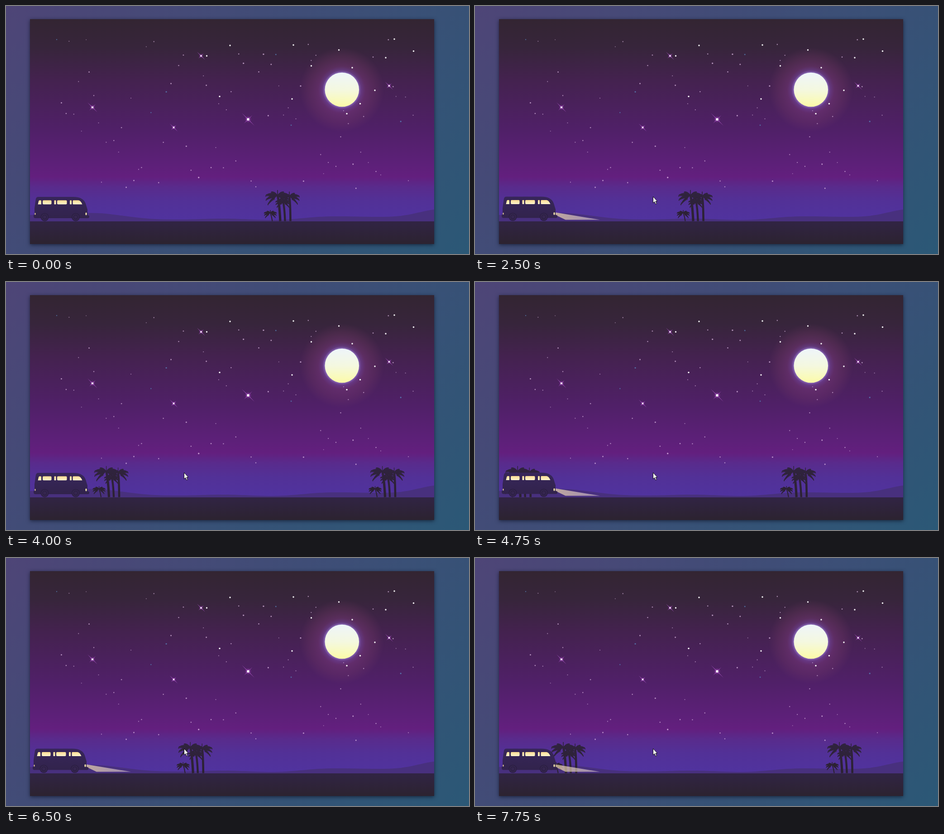
Animation of 1023 by 547 pixels, one loop 8000 ms. Source, as an HTML page:

```html
<!DOCTYPE html>
<html lang="en">
<head>
<meta charset="utf-8">
<title>Night drive</title>
<style>
html, body { margin: 0; width: 100%; height: 100%; overflow: hidden; background: linear-gradient(135deg, #4e4577, #2b5876); }
svg { display: block; width: 100%; height: 100%; }
.card { filter: drop-shadow(0 2px 4px rgba(12, 18, 38, .7)); }
</style>
</head>
<body>
<svg viewBox="0 0 1023 547" preserveAspectRatio="none">
  <defs>
    <linearGradient id="sky" x1="0" y1="29" x2="0" y2="475" gradientUnits="userSpaceOnUse">
      <stop offset="0" stop-color="#332532"/>
      <stop offset=".14" stop-color="#37253b"/>
      <stop offset=".3" stop-color="#44224f"/>
      <stop offset=".55" stop-color="#502068"/>
      <stop offset=".72" stop-color="#5d2079"/>
      <stop offset=".78" stop-color="#631f7e"/>
      <stop offset=".83" stop-color="#592b8c"/>
      <stop offset=".9" stop-color="#523197"/>
      <stop offset="1" stop-color="#50339f"/>
    </linearGradient>
    <linearGradient id="ground" x1="0" y1="0" x2="0" y2="1">
      <stop offset="0" stop-color="#312444"/>
      <stop offset="1" stop-color="#2c2330"/>
    </linearGradient>
    <linearGradient id="moon" x1="0" y1="0" x2="0" y2="1">
      <stop offset="0" stop-color="#eef5fa"/>
      <stop offset=".5" stop-color="#f4f8e0"/>
      <stop offset="1" stop-color="#fcfba8"/>
    </linearGradient>
    <radialGradient id="halo">
      <stop offset=".4" stop-color="#a58ae0" stop-opacity=".75"/>
      <stop offset=".46" stop-color="#8550b0" stop-opacity=".48"/>
      <stop offset=".56" stop-color="#853f80" stop-opacity=".38"/>
      <stop offset=".78" stop-color="#823f6c" stop-opacity=".22"/>
      <stop offset="1" stop-color="#80406a" stop-opacity="0"/>
    </radialGradient>
    <radialGradient id="flare">
      <stop offset="0" stop-color="#fff"/>
      <stop offset=".25" stop-color="#d877ea" stop-opacity=".7"/>
      <stop offset="1" stop-color="#a02ec0" stop-opacity="0"/>
    </radialGradient>
    <linearGradient id="glass" x1="0" y1="428" x2="0" y2="438" gradientUnits="userSpaceOnUse">
      <stop offset="0" stop-color="#fbd98f"/>
      <stop offset="1" stop-color="#fef7d0"/>
    </linearGradient>
    <linearGradient id="body" x1="0" y1="421" x2="0" y2="475" gradientUnits="userSpaceOnUse">
      <stop offset="0" stop-color="#37265a"/>
      <stop offset="1" stop-color="#31234a"/>
    </linearGradient>
    <linearGradient id="beamFill">
      <stop offset="0" stop-color="#ffe9b0" stop-opacity=".65"/>
      <stop offset="1" stop-color="#f4e4e4" stop-opacity=".5"/>
    </linearGradient>
    <linearGradient id="bark" x1="0" y1="403" x2="0" y2="475" gradientUnits="userSpaceOnUse">
      <stop offset="0" stop-color="#302340"/>
      <stop offset="1" stop-color="#2b2130"/>
    </linearGradient>
    <clipPath id="frame"><rect x="53" y="29" width="893" height="496"/></clipPath>
    <g id="grove" fill="url(#bark)" stroke="url(#bark)" stroke-linecap="round" stroke-linejoin="round"></g>
  </defs>

  <rect class="card" x="53" y="29" width="893" height="496" fill="#2c2330"/>
  <g clip-path="url(#frame)">
    <rect x="53" y="29" width="893" height="447" fill="url(#sky)"/>
    <circle cx="742" cy="184.500" r="93" fill="url(#halo)"/>
    <circle cx="742.300" cy="184.500" r="37.800" fill="url(#moon)"/>
    <g id="stars"></g>
    <path fill="#48307e" d="M53 461Q120 456 185 456.500C245 456 275 471 370 471C430 471 440 468.500 490 469C530 470 560 472 590 472C650 471 670 463.500 735 464C790 464 830 467 872 463C905 459 920 452 947 449V476H53Z"/>
    <rect x="53" y="475" width="893" height="50" fill="url(#ground)"/>
    <use id="near" href="#grove"/>
    <use id="far" href="#grove"/>
    <path id="beam" fill="url(#beamFill)" d="M176 455L276 471.500H200L178 461Z"/>
    <g id="van">
      <path fill="url(#body)" d="M71 421H148C165 421 173 427 176 436L180 449V461L184 462.500V466.500Q183 468 179 468H64Q61 467 61 465V461L63 460V446L65.500 428Q66 421 71 421Z"/>
      <g fill="url(#glass)">
        <path d="M74 428.500H76.500Q78 428.500 78 430V437.500H70.500L72 431Q72.500 428.500 74 428.500Z"/>
        <rect x="81" y="428.500" width="19.500" height="9" rx="2"/>
        <rect x="106.500" y="428.500" width="4" height="9" rx="1.200"/>
        <rect x="113" y="428.500" width="21.500" height="9" rx="2"/>
        <rect x="141" y="428.500" width="4" height="9" rx="1.200"/>
        <path d="M149 428.500H160Q165 429 168.500 437.500H149Q147.500 437.500 147.500 436V430Q147.500 428.500 149 428.500Z"/>
      </g>
      <ellipse cx="177" cy="458.500" rx="1.500" ry="3" fill="#fdeeb0"/>
      <ellipse cx="64.500" cy="458.500" rx="1" ry="2.300" fill="#f3d79c"/>
      <g id="wheels" fill="#35264f" stroke="#2a1e40" stroke-width="1.300"></g>
    </g>
  </g>
  <path id="cursor" fill="#fff" stroke="#111" stroke-width="1" stroke-linejoin="round" d="M.500 .500V14.500L3.700 11.500L6 17L8.300 16L6 10.800H10Z"/>
</svg>
<script>
const LOOP = 8000, STEP = 250;
const GAP = 610, SPEED = .1697, DEPART = 1770;
const $ = id => document.getElementById(id);

function add(parent, tag, attrs) {
  const el = document.createElementNS('http://www.w3.org/2000/svg', tag);
  for (const k in attrs) el.setAttribute(k, attrs[k]);
  parent.appendChild(el);
  return el;
}

let seed = 11;
function rand() {
  seed = (seed * 16807) % 2147483647;
  return seed / 2147483647;
}

function star(cx, cy, r, fill, opacity) {
  add($('stars'), 'circle', { cx, cy, r, fill, opacity });
}

// Faint stars, spread evenly across and at random heights
for (let i = 0; i < 84; i++) {
  const x = 112 + 794 * (i * .618034 % 1), y = 74 + 328 * rand(), size = rand();
  if (Math.hypot(x - 742, y - 184.5) < 45) continue;
  star(x, y, .9 + size * .75, i % 14 ? '#e6c2ec' : '#5c8fc4', .5 + size * .2);
}

// The brightest stars
for (const [x, y] of [[495, 87], [635, 86], [858, 73], [900.5, 99.5], [839, 114], [735.5, 97],
  [674.5, 132], [765, 136], [632, 205], [472, 199.5], [815, 186], [782.5, 215.5], [753, 237.5], [443.5, 110]]) {
  star(x, y, 1.75, '#fff', .95);
}

// Four-pointed sparkles with a longer falling diagonal
for (const [x, y, s] of [[191, 223.5, 11], [370.5, 268, 9], [431, 110, 9], [535, 250, 14], [846.5, 176, 9]]) {
  const a = s * .65, w = .55;
  const g = add($('stars'), 'g', { transform: `translate(${x} ${y})` });
  add(g, 'circle', { r: s * .55, fill: 'url(#flare)', opacity: .7 });
  add(g, 'path', { fill: '#b95fd4', opacity: .8,
    d: `M${-s} ${-s}L${w} ${-w}L${s} ${s}L${-w} ${w}ZM${a} ${-a}L${w} ${w}L${-a} ${a}L${-w} ${-w}Z` });
  add(g, 'circle', { r: s * .19, fill: '#fff' });
}

for (const cx of [85.5, 154]) {
  for (const r of [8.3, 4.4]) add($('wheels'), 'circle', { cx, cy: 465.6, r });
}

// A curved leaf with short leaflets hanging from its spine
function frond(x, y, dx, dy) {
  const len = Math.hypot(dx, dy), lift = len * .22, fat = len * .36;
  const mx = dx * .5, my = dy * .5 - lift;
  let d = `M${x} ${y}q${mx} ${my - fat * .3} ${dx} ${dy}q${-dx * .4} ${-dy * .5 - lift + fat} ${-dx} ${-dy}Z`;
  add($('grove'), 'path', { d, 'stroke-width': 1 });
  d = '';
  for (let t = .3; t < .97; t += .13) {
    const px = x + 2 * t * (1 - t) * mx + t * t * dx;
    const py = y + 2 * t * (1 - t) * my + t * t * dy;
    d += `M${px} ${py}l${dx * .07} ${len * .24 * (1.15 - t * .6)}`;
  }
  add($('grove'), 'path', { d, 'stroke-width': .9 + len * .04, fill: 'none' });
}

// A trunk and a drooping fan of fronds whose tips lie on an ellipse
function palm(x, y, foot, width, size) {
  add($('grove'), 'path', { d: `M${x} ${y}Q${(x + foot) / 2 + 1} ${y + 18 * size} ${foot} 474.5`,
    'stroke-width': width, 'stroke-linecap': 'butt', fill: 'none' });
  for (let i = 0; i < 9; i++) {
    const a = (-42 + i * 33) * Math.PI / 180, reach = i % 2 ? .9 : 1;
    frond(x, y, 28 * Math.cos(a) * reach * size, (7 - 18 * Math.sin(a)) * reach * size);
  }
}

palm(31, 417, 37, 5.2, 1);
palm(57, 419, 59.5, 4.6, .85);
palm(43, 431, 47.5, 4.4, .62);
palm(15, 456, 19.5, 2.2, .52);

// Places where the pointer rests: time, x, y
const stops = [[250, 445, 517], [500, 441, 504], [750, 444, 512], [1500, 393, 420]];

function draw(time) {
  const t = Math.floor(time / STEP) * STEP;
  const drift = 569 - SPEED * Math.max(0, t - DEPART);
  const x = (drift + 40 + GAP * 2) % GAP - 40;
  $('near').setAttribute('transform', `translate(${x} 0)`);
  $('far').setAttribute('transform', `translate(${x + GAP} 0)`);

  // While driving, the van jolts and its light blinks once a second
  const lit = t >= DEPART && t % 1000 >= 500;
  $('van').setAttribute('transform', lit ? 'translate(-2 -.5)' : '');
  $('beam').setAttribute('visibility', lit ? 'visible' : 'hidden');

  const stop = stops.filter(s => s[0] <= t).pop();
  $('cursor').setAttribute('visibility', stop ? 'visible' : 'hidden');
  if (stop) $('cursor').setAttribute('transform', `translate(${stop[1]} ${stop[2]})`);
}

const start = performance.now();
function tick() {
  draw((performance.now() - start) % LOOP);
  requestAnimationFrame(tick);
}
tick();
</script>
</body>
</html>
```
